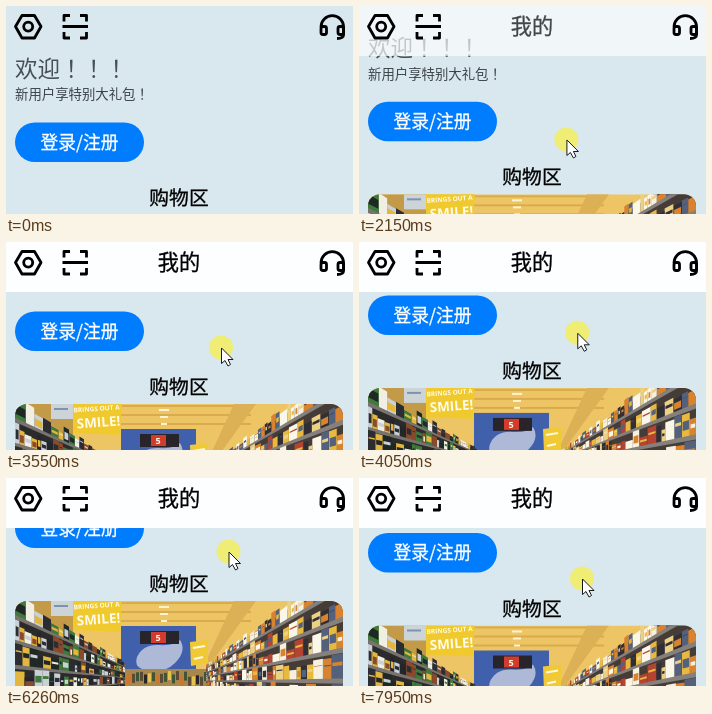
These frames come from a looping animation (347x208 px, 8000 ms). An HTML page:

```html
<!DOCTYPE html>
<html lang="zh-CN">
<head>
<meta charset="utf-8">
<title>我的</title>
<style>
  html, body { margin: 0; width: 100%; height: 100%; overflow: hidden; background: #d9e7ee; }
  svg { display: block; width: 100vw; height: 100vh; }
  text { font-family: "Noto Sans CJK SC", "Noto Sans CJK", sans-serif; }
  .mark { font-family: "Noto Sans CJK JP", "Noto Sans CJK", sans-serif; }
  .mid { text-anchor: middle; fill: #000; stroke: #000; stroke-width: .3; }
  .mid.light { fill: #fff; stroke: #fff; }
  .sign { font-family: "Open Sans", sans-serif; font-weight: 700; text-anchor: middle; fill: #fffbe6; }
  .icon { fill: none; stroke: #000; stroke-width: 2.8; stroke-linejoin: round; }
</style>
</head>
<body>
<svg viewBox="0 0 347 208" preserveAspectRatio="none">
  <defs>
    <clipPath id="card"><rect x="9" y="209" width="328" height="180" rx="12"/></clipPath>
  </defs>
  <rect width="347" height="208" fill="#d9e7ee"/>

  <g id="page">
    <text x="9" y="70.5" font-size="22.5" fill="#464f56">欢迎<tspan class="mark" lang="ja">！！！</tspan></text>
    <text x="9" y="93.4" font-size="13.4" fill="#3a4349">新用户享特别大礼包<tspan class="mark" lang="ja">！</tspan></text>
    <rect x="9" y="116.5" width="129" height="39.5" rx="19.75" fill="#007dff"/>
    <text class="mid light" x="73.500" y="142.700" font-size="17.8">登录/注册</text>
    <text class="mid" x="173" y="199" font-size="19.8">购物区</text>
    <g clip-path="url(#card)"><g id="shop" transform="translate(0 209)"></g></g>
  </g>

  <g id="bar">
    <rect width="347" height="50" fill="#fdfeff"/>
    <text class="mid" x="173" y="28" font-size="21.2">我的</text>
  </g>

  <g class="icon">
    <path d="M16 9.500H28.500L35 20.500L28.500 32H16L9.500 20.500Z"/>
    <circle cx="22.200" cy="20.600" r="4.500"/>
    <path d="M58 15.500V9.500H64M74 9.500H80.500V15.500M80.500 26V32H74M64 32H58V26M56.500 20.500H82"/>
    <path d="M315 21A11.300 11.300 0 0 1 337.600 21V28.500Q337.600 32.500 331 32.500"/>
    <rect x="315" y="20.500" width="5.500" height="8" rx="2"/>
    <rect x="332" y="20.500" width="5.500" height="8" rx="2"/>
  </g>

  <g id="pointer">
    <circle id="press" r="12" fill="#f1ee68" fill-opacity=".92"/>
    <path d="M.5 .5V16L4 13L7 18.500L9.500 17L7 12H12Z" fill="#fff" stroke="#15181c"/>
  </g>
</svg>

<script>
const $ = id => document.getElementById(id);
const mix = (a, b, k) => a + (b - a) * k;

let seed = 11;
const rand = () => (seed = (seed * 16807) % 2147483647) / 2147483647;
const pick = list => list[Math.floor(rand() * list.length)];
const poly = (pts, fill) => `<polygon points="${pts.join(' ')}" fill="${fill}"/>`;
const box = (x, y, w, h, fill) => `<rect x="${x}" y="${y}" width="${w}" height="${h}" fill="${fill}"/>`;
const label = (x, y, size, text) => `<text class="sign" x="${x}" y="${y}" font-size="${size}">${text}</text>`;

// Evenly spaced shelves that run from the picture's edge to a vanishing point.
function shelves({ edge, top, gap, vx, vy, end, back, board, goods }) {
  const at = (y, t) => [mix(edge, vx, t), mix(y, vy, t)];
  const quad = (y0, y1, t0, t1, fill) => poly([at(y0, t0), at(y0, t1), at(y1, t1), at(y1, t0)], fill);
  let out = quad(top + gap * 0.5, 180, 0, end, back);
  for (let low = top + gap; low < 180; low += gap) {
    for (let t = 0; t < end;) {
      const next = Math.min(end, t + mix(0.03, 0.08, rand()) * (1 - t));
      const high = low - gap * mix(0.45, 0.95, rand());
      out += quad(high, low, t, next, pick(goods));
      out += quad(mix(high, low, 0.3), mix(high, low, 0.3 + rand() * 0.5), t + 0.005, next - 0.005, pick(goods));
      t = next;
    }
    out += quad(low - gap * 0.05, low + gap * 0.12, 0, end, board);
  }
  return out;
}

function drawShop() {
  // ceiling and its beams
  let s = box(9, 0, 328, 180, '#eec565') + box(9, 0, 58, 70, '#c29a48');
  s += box(45, 0, 22, 15, '#ccd4d8') + box(48, 4, 14, 2, '#7f93b0');
  for (let i = 0; i < 3; i++) {
    s += box(115, 1 + i * 9, 130, 2, '#d9ab4c') + box(153 + i, 5 + i * 7, 10 - i * 2, 2, '#fff4cd');
  }
  s += poly([[228, 0], [250, 0], [205, 62], [200, 60]], '#dcb055');

  // back wall with a queue display
  s += box(115, 25, 75, 46, '#4160ac');
  s += '<path d="M131 56Q137 43 153 44T174 39Q181 50 169 62T136 68Q128 65 131 56Z" fill="#aeb9d8"/>';
  s += box(134, 30, 39, 13, '#28242a') + box(145, 31, 15, 11, '#d33b2d') + label(152, 40, 9, '5');

  // middle counters
  s += box(110, 68, 105, 112, '#a8874d');
  for (let x = 110; x < 215; x += 4) {
    s += box(x, 70 + rand() * 6, 3, 9, pick(['#e9c24d', '#5b4a35', '#c9772f', '#3e5636', '#26262a']));
  }

  s += shelves({ edge: 9, top: -10, gap: 25, vx: 150, vy: 80, end: 0.78, back: '#2b2b2b', board: '#77736f',
    goods: ['#1f2824', '#2c2d33', '#3f7a3c', '#e3b73d', '#f1eee4', '#24262e', '#8a4a2c', '#c9d0d6'] });
  s += shelves({ edge: 337, top: -45, gap: 31, vx: 178, vy: 80, end: 0.86, back: '#453c38', board: '#85807b',
    goods: ['#f6f0de', '#e9b93f', '#fbf7e8', '#d9822f', '#2f2f35', '#b44432', '#54617c', '#ecd083'] });

  // hanging signs
  s += poly([[67, -6], [116, -3], [114, 31], [67, 29]], '#f0c92f');
  s += `<g transform="rotate(-4 91 12)">${label(91, 7, 6.5, 'BRINGS OUT A')}${label(92, 23, 13.5, 'SMILE!')}</g>`;
  s += poly([[184, 41], [202, 39], [202, 62], [185, 65]], '#f0c936');
  s += '<path d="M187 47L199 45M188 58L197 56" stroke="#fff8da" stroke-width="2"/>';
  return s;
}
$('shop').innerHTML = drawShop();

const LOOP = 8000;
// time, scroll, pointer x, pointer y
const drag = [
  [1110, 0, 205, 153], [1520, 10, 206, 142], [2850, 32.500, 209, 124], [3550, 47, 215, 105.500],
  [4600, 81.500, 222, 74], [5020, 86, 222.500, 73.500], [6470, 86, 222.500, 73.500], [7940, 61.500, 223, 100.500]
];

function pose(t) {
  const i = Math.max(1, drag.findIndex(key => key[0] > t));
  const a = drag[t >= LOOP - 60 ? drag.length - 2 : i - 1];
  const b = drag[t >= LOOP - 60 ? drag.length - 1 : i];
  const k = Math.min(1, Math.max(0, (t - a[0]) / (b[0] - a[0])));
  return a.map((v, n) => mix(v, b[n], k));
}

// The screen refreshes every 70 ms, counted from these moments.
function tick(t) {
  const start = [6260, 1520, 200, 0].find(from => from <= t);
  return start + Math.floor((t - start) / 70) * 70;
}

function draw(ms) {
  const t = tick(ms);
  const [, scroll, x, y] = pose(t);
  const away = Math.max(0, 1 - (t - 130) / 280) ** 2;
  $('page').setAttribute('transform', `translate(0 ${-scroll})`);
  $('bar').setAttribute('opacity', Math.min(1, scroll / 30));
  $('pointer').setAttribute('transform', `translate(${x + away * 155} ${y + away * 60})`);
  $('pointer').setAttribute('visibility', t < 200 ? 'hidden' : 'visible');
  $('press').setAttribute('opacity', (t >= 900 && t < 5020) || t >= 6260 ? 1 : 0);
}

const begin = performance.now();
function frame() {
  draw((performance.now() - begin) % LOOP);
  requestAnimationFrame(frame);
}
frame();
</script>
</body>
</html>
```
